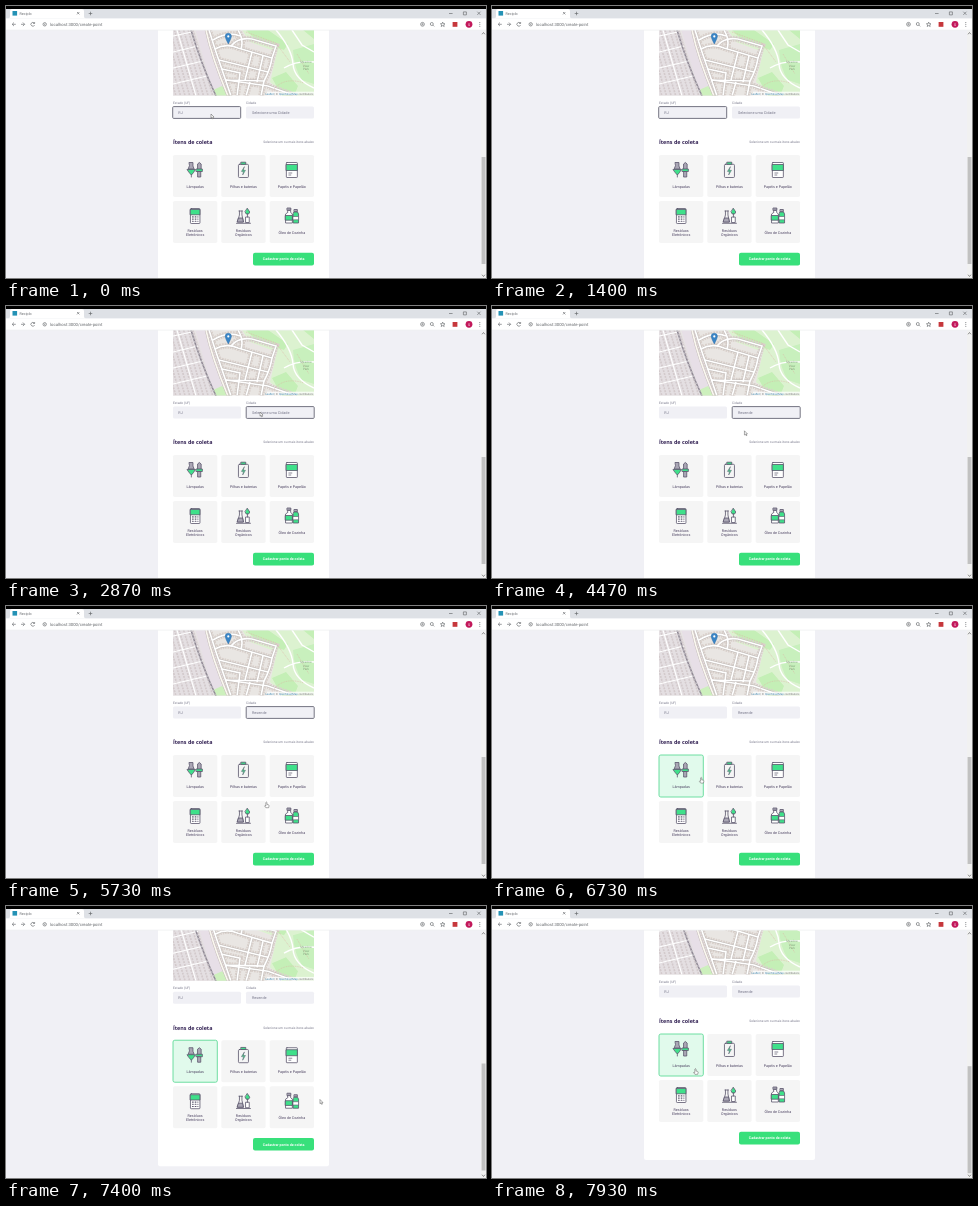
These frames come from a looping animation (480 px wide and 272 px high, 8 s). An HTML page:

```html
<!DOCTYPE html>
<html lang="pt-BR">
<head>
<meta charset="utf-8">
<title>Reciplo</title>
<style>
  html, body { margin: 0; width: 100%; height: 100%; overflow: hidden; background: #f0f0f5; }
  svg { display: block; width: 100vw; height: 100vh; }
  text { font-family: Roboto, "Noto Sans", sans-serif; text-rendering: geometricPrecision; }
  .label { font-size: 3.3px; fill: #77778a; }
  .value { font-size: 3.8px; fill: #77778a; }
  .field { fill: #f0f0f5; }
  .focus { fill: none; stroke: #666674; stroke-width: .9; }
  .card { fill: #f5f5f5; }
  .card.selected { fill: #e1faec; stroke: #5fdb98; stroke-width: .9; }
  .name { font-size: 3.7px; fill: #4a4060; text-anchor: middle; }
  .icon { fill: none; stroke: #5b566c; stroke-width: .8; stroke-linejoin: round; stroke-linecap: round; }
  .icon .g { fill: #3fe08a; }
  .icon .d { fill: #aaa7b5; }
  .icon .w { fill: #fff; }
  .chrome { fill: none; stroke: #66696d; stroke-width: .65; }
  .houses { fill: none; stroke: #d9d0cb; stroke-width: 6; stroke-dasharray: 1.7 .9; }
  .casing { fill: none; stroke: #bdb8b5; stroke-width: 2.5; }
  .road { fill: none; stroke: #fff; stroke-width: 1.7; }
</style>
</head>
<body>
<svg viewBox="0 0 480 272" preserveAspectRatio="none">
  <defs>
    <clipPath id="page"><rect y="24" width="480" height="248"/></clipPath>
    <clipPath id="mapClip"><rect x="167" y="0" width="141" height="89.5"/></clipPath>
    <g id="streets">
      <path d="M203 24L209 43L225 90M209 43Q220 37 232 42L266 52Q264 64 258 75L220 74"/>
      <path d="M213 54L262 66M216 63L234 67L231 90M235 43Q238 34 232 24M246 46L239 74"/>
      <path d="M225 40Q232 31 246 33L270 40L266 52M257 50L251 76M220 74L262 80L290 90"/>
      <path d="M207 34Q222 25 234 30M244 76L240 90M258 75L255 90"/>
    </g>
  </defs>

  <g clip-path="url(#page)">
    <rect y="24" width="480" height="248" fill="#f0f0f5"/>
    <g id="content">
      <rect x="152" y="-40" width="171" height="315" rx="2" fill="#fff"/>
      <g clip-path="url(#mapClip)">
        <rect x="167" width="141" height="90" fill="#e9e6e3"/>
        <path d="M167 0H180L211 90H167Z" fill="#e4dfe2"/>
        <path d="M182 0H198L224 90H209Z" fill="#e7dfe7"/>
        <g id="blocks" stroke="#d3cacc" stroke-width="1.7" stroke-dasharray="2 1"></g>
        <path d="M167 46L192 40M167 62L197 55M167 78L201 70M167 30L186 26M171 24L190 90" stroke="#fff" stroke-width="1.1" fill="none"/>
        <path d="M236 24H308V90H281L264 76L271 46L244 36Z" fill="#dcf2d0"/>
        <path d="M287 44L308 38V78L296 74Q288 62 287 44Z" fill="#c8f0bd"/>
        <path d="M240 24H262L282 38L278 44L250 34ZM266 72L280 66L292 80L288 90H276ZM297 24H308V33Z" fill="#c4efb6"/>
        <path d="M207 84L216 80L226 90H209Z" fill="#cdf0bd"/>
        <use href="#streets" class="houses"/>
        <use href="#streets" class="casing"/>
        <use href="#streets" class="road"/>
        <g fill="none">
          <path d="M185 24Q194 55 210 90" stroke="#8f8894" stroke-width="1.5"/>
          <path d="M185 24Q194 55 210 90" stroke="#eee" stroke-width=".6" stroke-dasharray="2 2"/>
          <path d="M200 24Q206 52 222 90" stroke="#bdb4b4" stroke-width="2.5"/>
          <path d="M200 24Q206 52 222 90" stroke="#faf7ef" stroke-width="1.7"/>
          <path d="M270 24Q286 43 287 58T308 82M278 62Q292 54 308 56M286 24L296 39L308 46" stroke="#fff" stroke-width="1.4"/>
          <path d="M240 26L270 37L284 56M266 86Q276 70 298 77M291 48L303 68" stroke="#dcaaa0" stroke-width=".5" stroke-dasharray="1 .8"/>
        </g>
        <g font-size="3" fill="#7fa37a" text-anchor="middle">
          <text x="300" y="57">Meadow</text><text x="300" y="60.5">View</text><text x="300" y="64">Park</text>
        </g>
        <path d="M222.3 38Q219.2 32.5 219.2 30.3A3.1 3.1 0 0 1 225.4 30.3Q225.4 32.5 222.3 38Z" fill="#3a85c6" stroke="#2d6da5" stroke-width=".4"/>
        <circle cx="222.3" cy="30.4" r="1.1" fill="#fff"/>
        <rect x="261" y="85.7" width="47" height="4" fill="#fff" opacity=".75"/>
        <text x="307.3" y="88.6" font-size="2.75" fill="#666" text-anchor="end"><tspan fill="#3c83ad">Leaflet</tspan> | © <tspan fill="#3c83ad">OpenStreetMap</tspan> contributors</text>
      </g>

      <text class="label" x="167" y="98">Estado (UF)</text>
      <text class="label" x="240" y="98">Cidade</text>
      <rect class="field" x="167" y="100.5" width="68" height="12" rx="1.5"/>
      <rect class="field" x="240" y="100.5" width="68" height="12" rx="1.5"/>
      <rect id="stateFocus" class="focus" x="166.7" y="100.6" width="68" height="11.8" rx="1"/>
      <rect id="cityFocus" class="focus" x="240.2" y="100.6" width="68" height="11.8" rx="1"/>
      <text class="value" x="172.3" y="108">RJ</text>
      <text id="city" class="value" x="246" y="108"></text>

      <text x="167" y="138.3" font-size="5.4" font-weight="700" fill="#322153" style="font-family:'Open Sans','Noto Sans',sans-serif">Ítens de coleta</text>
      <text x="308" y="137.3" font-size="3.3" fill="#77778a" text-anchor="end">Selecione um ou mais itens abaixo</text>
      <g id="cards"></g>
      <rect x="247" y="246.8" width="61" height="12.6" rx="2" fill="#38e07b"/>
      <text x="277.7" y="254.4" font-size="3.6" font-weight="700" fill="#fff" text-anchor="middle">Cadastrar ponto de coleta</text>
    </g>
    <rect x="475" y="24" width="5" height="248" fill="#f1f1f1"/>
    <rect id="thumb" x="475.6" y="151" width="3.9" height="107" fill="#c1c1c1"/>
    <path d="M476 28.3L477.5 26.5L479 28.3M476 268.7L477.5 270.5L479 268.7" fill="none" stroke="#666" stroke-width=".7"/>
  </g>

  <rect width="480" height="12.5" fill="#dee1e6"/>
  <rect width="480" height="3" fill="#000"/>
  <path d="M2 12.5Q4 12.5 4 10.5V5Q4 3 6 3H76Q78 3 78 5V10.5Q78 12.5 80 12.5Z" fill="#fff"/>
  <rect y="12.5" width="480" height="11.7" fill="#fff"/>
  <rect y="23.8" width="480" height=".5" fill="#e4e6e8"/>
  <rect x="6.5" y="5" width="4.6" height="4.6" fill="#2492b5"/>
  <text x="13.5" y="8.8" font-size="3.7" fill="#66696d">Reciplo</text>
  <g class="chrome">
    <path d="M71 6L73.4 8.4M73.4 6L71 8.4M82.7 7.5H86.3M84.5 5.7V9.3"/>
    <path d="M443 7.5H446.6M457.4 5.9H460.4V8.9H457.4ZM471.3 5.7L474.5 8.9M474.5 5.7L471.3 8.9"/>
    <path d="M9.8 18.3H6.3M8 16.5L6.2 18.3L8 20.1M15 18.3H18.5M16.9 16.5L18.7 18.3L16.9 20.1"/>
    <path d="M28.4 17.2A1.9 1.9 0 1 0 28.6 19M28.6 16V17.5H27.1"/>
    <circle cx="38.7" cy="18.3" r="1.7"/><path d="M38.7 18V19.2M38.7 17V17.4"/>
    <circle cx="416.5" cy="18.3" r="1.9"/><circle cx="416.5" cy="18.3" r=".6"/>
    <circle cx="425.8" cy="18" r="1.5"/><path d="M426.9 19.1L428.2 20.4"/>
    <path d="M436.7 16.1L437.3 17.7L439 17.8L437.7 18.9L438.2 20.5L436.7 19.6L435.2 20.5L435.7 18.9L434.4 17.8L436.1 17.7Z"/>
  </g>
  <text x="44" y="20" font-size="4.25" fill="#66696d">localhost:3000/create-point</text>
  <rect x="446.6" y="16" width="4.8" height="4.8" fill="#c6373c"/>
  <circle cx="463" cy="18.3" r="3.4" fill="#c2185b"/>
  <text x="463" y="19.6" font-size="3.6" fill="#fff" text-anchor="middle">S</text>
  <g fill="#66696d"><circle cx="473.8" cy="16.4" r=".5"/><circle cx="473.8" cy="18.3" r=".5"/><circle cx="473.8" cy="20.2" r=".5"/></g>

  <g id="cursor" fill="#fff" stroke="#555" stroke-width=".5" stroke-linejoin="round">
    <path id="arrow" d="M0 0V4.2L1 3.4L1.7 4.9L2.4 4.6L1.8 3.1H3Z"/>
    <path id="hand" d="M-.6 .5Q0 -.4 .5 .5V2.5L2.2 3Q2.8 3.2 2.6 4L2.2 5.8H-.6L-1.9 4Q-1.7 3.1 -.6 4Z"/>
  </g>
</svg>
<script>
const LOOP = 8000;
const $ = id => document.getElementById(id);

// Icons are drawn around the origin.
const cards = [
  { x: 167, y: 149, lines: ['Lâmpadas'], icon: `
    <path class="d" d="M-5.8 -7.5H-2.2V-4L-1 -1H-7L-5.8 -4Z"/><path class="g" d="M-7.8 -.5H.2L-1.6 2.5L-3.8 5L-6 2.5Z"/><path d="M-3.8 5V7"/>
    <path class="d" d="M2.4 -1V-6Q4.2 -9 6 -6V-1Z"/><path class="g" d="M1.2 -1H7.2V1.5H1.2Z"/><path class="d" d="M2.8 1.5H5.6V7H2.8Z"/>` },
  { x: 215.3, y: 149, lines: ['Pilhas e baterias'], icon: `
    <rect x="-5" y="-5.7" width="10" height="13.2" rx="1"/><path class="g" d="M-2.3 -7.8H2.3V-5.7H-2.3Z"/>
    <path class="g" stroke-width=".5" d="M.8 -3L-2 1.4H0L-.8 5L2 .3H0Z"/>` },
  { x: 263.7, y: 149, lines: ['Papéis e Papelão'], icon: `
    <rect class="w" x="-5.5" y="-7.5" width="11" height="15" rx=".6"/><path class="g" d="M-5.5 -5.5H5.5V.5H-5.5Z"/>
    <path d="M-3 3H0M-3 5H-1" stroke-width=".7"/>` },
  { x: 167, y: 195, lines: ['Resíduos', 'Eletrônicos'], icon: `
    <rect class="w" x="-4.7" y="-7.5" width="9.5" height="15" rx=".8"/><path class="g" d="M-4.7 -6.5H4.8V-1.2H-4.7Z"/>
    <path d="M-2.7 .9H2.8M-2.7 3.1H2.8M-2.7 5.3H2.8" stroke-width="1.1" stroke-dasharray=".8 1.9"/>` },
  { x: 215.3, y: 195, lines: ['Resíduos', 'Orgânicos'], icon: `
    <path d="M-4.5 -5H-1M-4 -5V-1L-6 6H0L-1.5 -1V-5M-7 7.3H7"/><path class="d" d="M-4.7 2H-.9L0 6H-6Z"/>
    <path class="g" d="M4 -7.5L6.3 -4L5.2 -2H2.8L1.7 -4Z"/><path class="w" d="M2.5 1H5.8V6.5H2.5Z"/><path d="M4 -2V1"/>` },
  { x: 263.7, y: 195, lines: ['Óleo de Cozinha'], icon: `
    <path class="d" d="M-4.5 -8H-1V-5.8H-4.5Z"/><path class="w" d="M-4.2 -5.5H-1.2V-3.5L.5 -2V7H-6.3V-2L-4.2 -3.5Z"/>
    <path class="g" d="M-6.3 -.5H.5V4.2H-6.3Z"/><path class="d" d="M2.5 -6.5H5.5V-4.3H2.5Z"/>
    <path class="g" d="M2.3 -4H5.7L6.7 -2V7H1.3V-2Z"/><path class="w" stroke-width=".6" d="M1.3 .5H6.7V3.8H1.3Z"/>` },
];
const CARD = { w: 44.3, h: 42 };

$('cards').innerHTML = cards.map(({ x, y, lines, icon }) => {
  const cx = x + CARD.w / 2;
  const top = y === 149 ? 182 : lines.length > 1 ? 225.6 : 228;
  const names = lines.map((s, i) => `<text class="name" x="${cx}" y="${top + i * 4.6}">${s}</text>`).join('');
  return `<rect class="card" x="${x}" y="${y}" width="${CARD.w}" height="${CARD.h}" rx="1.8"/>
    <g class="icon" transform="translate(${cx} ${y + 15})">${icon}</g>${names}`;
}).join('');
const lamps = document.querySelector('.card');

$('blocks').innerHTML = Array.from({ length: 9 }, (_, i) =>
  `<path d="M${150 + i * 4.6} 24l20 66"/>`).join('');

// Rows of [ms, value, ...]; values between rows are interpolated.
const pointer = [
  [0, 205, 108], [2330, 205, 108], [2400, 249, 114], [2600, 249, 114],
  [2670, 253, 109], [2800, 253, 109], [2870, 254, 106], [4330, 254, 106],
  [4600, 251, 142], [4900, 256, 184], [5070, 258, 196], [5330, 258, 196],
  [5400, 260.6, 196], [5730, 260.6, 196], [5950, 232, 184], [6200, 198, 168],
  [6670, 198, 168], [6930, 246, 182], [7200, 309.3, 193.5], [7270, 309.3, 193.5],
  [7400, 314, 193.5], [7470, 312, 192], [7700, 246, 177], [7930, 203.5, 162.5], [LOOP, 203.5, 162.5],
];
const scroll = [
  [0, 0], [7200, 0], [7270, 1], [7330, 7], [7400, 14.7], [7470, 20], [7530, 20.8], [7600, 21], [LOOP, 21],
];

function sample(rows, t) {
  const i = Math.max(1, rows.findIndex(r => r[0] > t));
  const [a, b] = [rows[i - 1], rows[i]];
  const p = (t - a[0]) / (b[0] - a[0]);
  return a.slice(1).map((v, k) => v + (b[k + 1] - v) * p);
}

const show = (id, on) => $(id).style.display = on ? '' : 'none';
const overCard = (x, y) => cards.some(c =>
  x >= c.x - 1 && x <= c.x + CARD.w + 1.1 && y >= c.y && y <= c.y + CARD.h);

function draw(now) {
  const t = now % LOOP;
  const [x, y] = sample(pointer, t);
  const [offset] = sample(scroll, t);
  const hand = overCard(x, y + offset);

  $('content').setAttribute('transform', `translate(0 ${-offset})`);
  $('thumb').setAttribute('y', 151 + offset * .44);
  $('cursor').setAttribute('transform', `translate(${x} ${y})`);
  show('cursor', t < 70 || t >= 2400);
  show('hand', hand);
  show('arrow', !hand);
  show('stateFocus', t < 2400);
  show('cityFocus', t >= 2870 && t < 6670);
  $('city').textContent = t < 3530 ? 'Selecione uma Cidade' : 'Resende';
  lamps.classList.toggle('selected', t >= 6670);
}

const start = performance.now();
(function tick() {
  draw(performance.now() - start);
  requestAnimationFrame(tick);
})();
</script>
</body>
</html>
```
